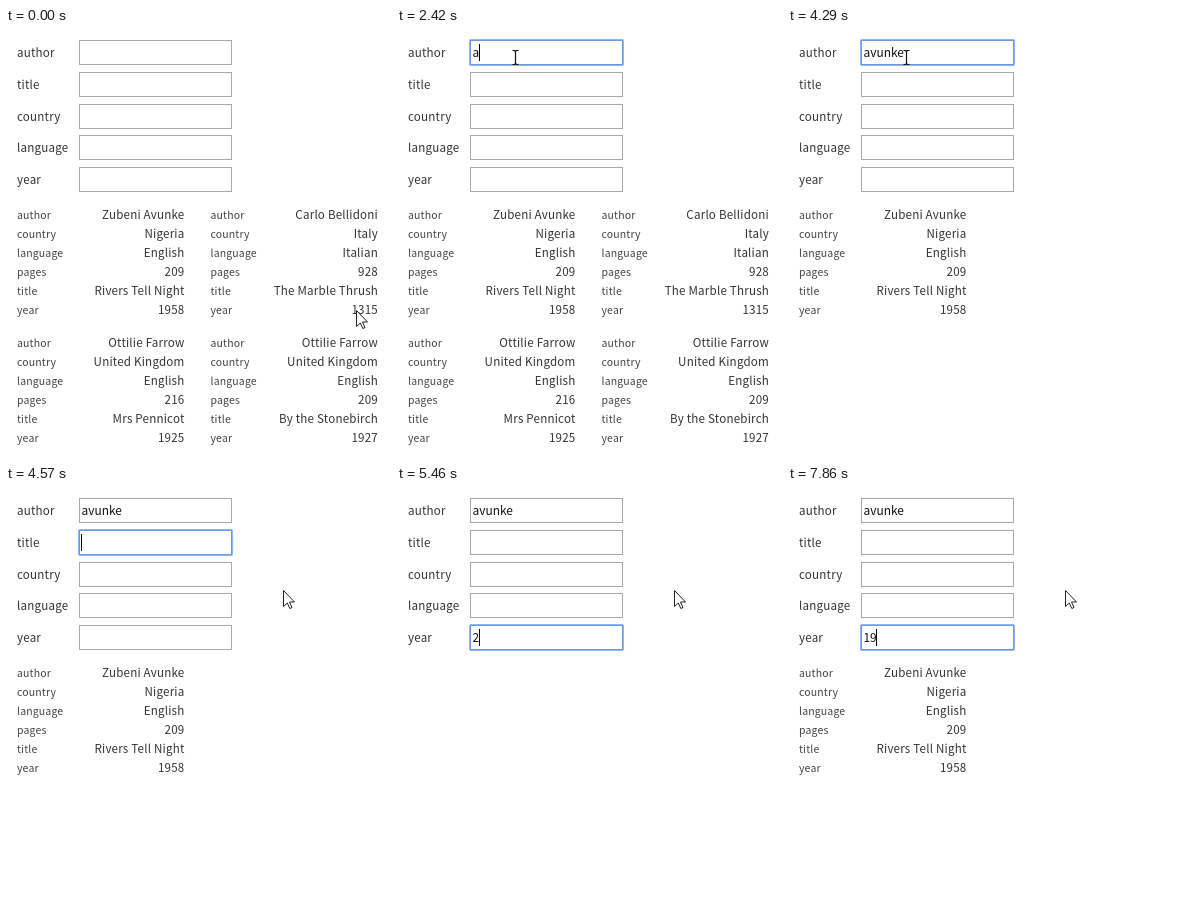
Write an HTML page that moves like this. It is 385x430 px and loops after 8000 ms.

```html
<!DOCTYPE html>
<html lang="en">
<head>
<meta charset="utf-8">
<title>Book filter</title>
<style>
html, body { margin: 0; width: 100%; height: 100%; overflow: hidden; background: #fff; }
svg { display: block; font: 11.6px "Noto Sans CJK JP", "Noto Sans CJK SC", "Noto Sans CJK", "Open Sans", sans-serif; letter-spacing: .2px; fill: #333; }
text { white-space: pre; }
.key { font-size: 10.5px; letter-spacing: .15px; fill: #444; }
.value { text-anchor: end; }
.typed { font-size: 11.93px; letter-spacing: 0; fill: #111; }
.box { fill: none; stroke: #a9a9a9; }
.ring { fill: none; stroke: #4d90fe; stroke-width: 2; stroke-opacity: .65; }
</style>
</head>
<body>
<svg id="stage" width="385" height="430"></svg>
<script>
const LOOP = 8000;
const stage = document.getElementById('stage');
const fields = ['author', 'title', 'country', 'language', 'year'];
const tops = [12, 44, 76, 107, 139];
const keys = ['author', 'country', 'language', 'pages', 'title', 'year'];
const books = [
  ['Zubeni Avunke', 'Nigeria', 'English', '209', 'Rivers Tell Night', '1958'],
  ['Carlo Bellidoni', 'Italy', 'Italian', '928', 'The Marble Thrush', '1315'],
  ['Ottilie Farrow', 'United Kingdom', 'English', '216', 'Mrs Pennicot', '1925'],
  ['Ottilie Farrow', 'United Kingdom', 'English', '209', 'By the Stonebirch', '1927'],
];

// [time, value] lists: each value holds until the next entry
const authorText = [[0, ''], [2350, 'a'], [2470, 'av'], [2700, 'avu'], [3290, 'avun'], [3520, 'avunk'], [3580, 'avunke']];
const yearText = [[0, ''], [5460, '2'], [5580, '20'], [5930, '201'], [6130, '2015'], [6630, '201'],
  [6700, '20'], [6920, '2'], [7190, ''], [7790, '1'], [7860, '19']];
const focus = [[0, -1], [1010, 0], [4570, 1], [4710, 2], [4920, 3], [5080, 4]];
const caretOn = [[0, 0], [1060, 1], [1600, 0], [2350, 1], [3230, 0], [3290, 1], [4070, 0], [4570, 1],
  [6770, 0], [7190, 1], [7710, 0], [7790, 1]];
const at = (list, t) => list.findLast(([start]) => start <= t)[1];

function add(tag, attrs, parent = stage, content = '') {
  const el = document.createElementNS('http://www.w3.org/2000/svg', tag);
  for (const name in attrs) el.setAttribute(name, attrs[name]);
  el.textContent = content;
  parent.append(el);
  return el;
}
const show = (el, on) => el.setAttribute('visibility', on ? 'visible' : 'hidden');

const inputs = fields.map((name, i) => {
  const y = tops[i];
  add('text', { x: 11, y: y + 17 }, stage, name);
  add('rect', { class: 'box', x: 73.5, y: y + .5, width: 152, height: 24 });
  return add('text', { class: 'typed', x: 75.5, y: y + 17 });
});

const cards = books.map((book, i) => {
  const card = add('g', { transform: `translate(${i % 2 * 193.5} ${i < 2 ? 191 : 319})` });
  book.forEach((value, row) => {
    add('text', { class: 'key', x: 11, y: row * 19 }, card, keys[row]);
    add('text', { class: 'value', x: 178.5, y: row * 19 }, card, value);
  });
  return card;
});

const ring = add('rect', { class: 'ring', x: 73, width: 153, height: 25, rx: 1 });
const caret = add('rect', { width: 1, height: 17, fill: '#000' });
const halo = add('circle', { cx: 117.5, cy: 29.5, r: 10.5, fill: '#ff0', 'fill-opacity': .47 });
const arrow = add('path', { d: 'M.5 .5V16.5L4.3 13L6.8 18.5L9 17.5L6.5 12H11.5Z', fill: '#fff', stroke: '#222' });
const beam = add('path', { d: 'M-3 -7H-1L0 -6L1 -7H3M0 -6V6M-3 7H-1L0 6L1 7H3', fill: 'none', stroke: '#111', 'stroke-width': 1.2 });

function glide(t, start, end, from, to) {
  const p = Math.min(1, Math.max(0, (t - start) / (end - start)));
  const eased = p * p * (3 - 2 * p);
  return from.map((v, i) => Math.round(v + (to[i] - v) * eased));
}

function pointerAt(t) {
  if (t < 680) return glide(t, 70, 680, [350, 282], [125, 32]);
  if (t < 4290) return glide(t, 680, 830, [125, 32], [118, 29]);
  return glide(t, 4290, 4520, [118, 29], [277, 104]);
}

function drawPointer(t) {
  const [x, y] = pointerAt(t);
  const overInput = x > 73 && x < 226 && tops.some(top => y >= top && y <= top + 25);
  arrow.setAttribute('transform', `translate(${x} ${y})`);
  beam.setAttribute('transform', `translate(${x + .5} ${y + .5})`);
  show(arrow, !overInput);
  show(beam, overInput);
  show(halo, t >= 1010 && t < 1250);
}

function draw(now) {
  const t = now % LOOP;
  const author = at(authorText, t), year = at(yearText, t), active = at(focus, t);
  inputs[0].textContent = author;
  inputs[4].textContent = year;
  cards.forEach((card, i) => show(card,
    books[i][0].toLowerCase().includes(author) && books[i][5].includes(year)));

  show(ring, active >= 0);
  show(caret, active >= 0 && at(caretOn, t));
  if (active >= 0) {
    ring.setAttribute('y', tops[active]);
    caret.setAttribute('x', Math.floor(75.5 + inputs[active].getComputedTextLength()));
    caret.setAttribute('y', tops[active] + 4);
  }
  drawPointer(t);
}

const begin = performance.now();
function tick() {
  draw(performance.now() - begin);
  requestAnimationFrame(tick);
}
tick();
</script>
</body>
</html>
```
